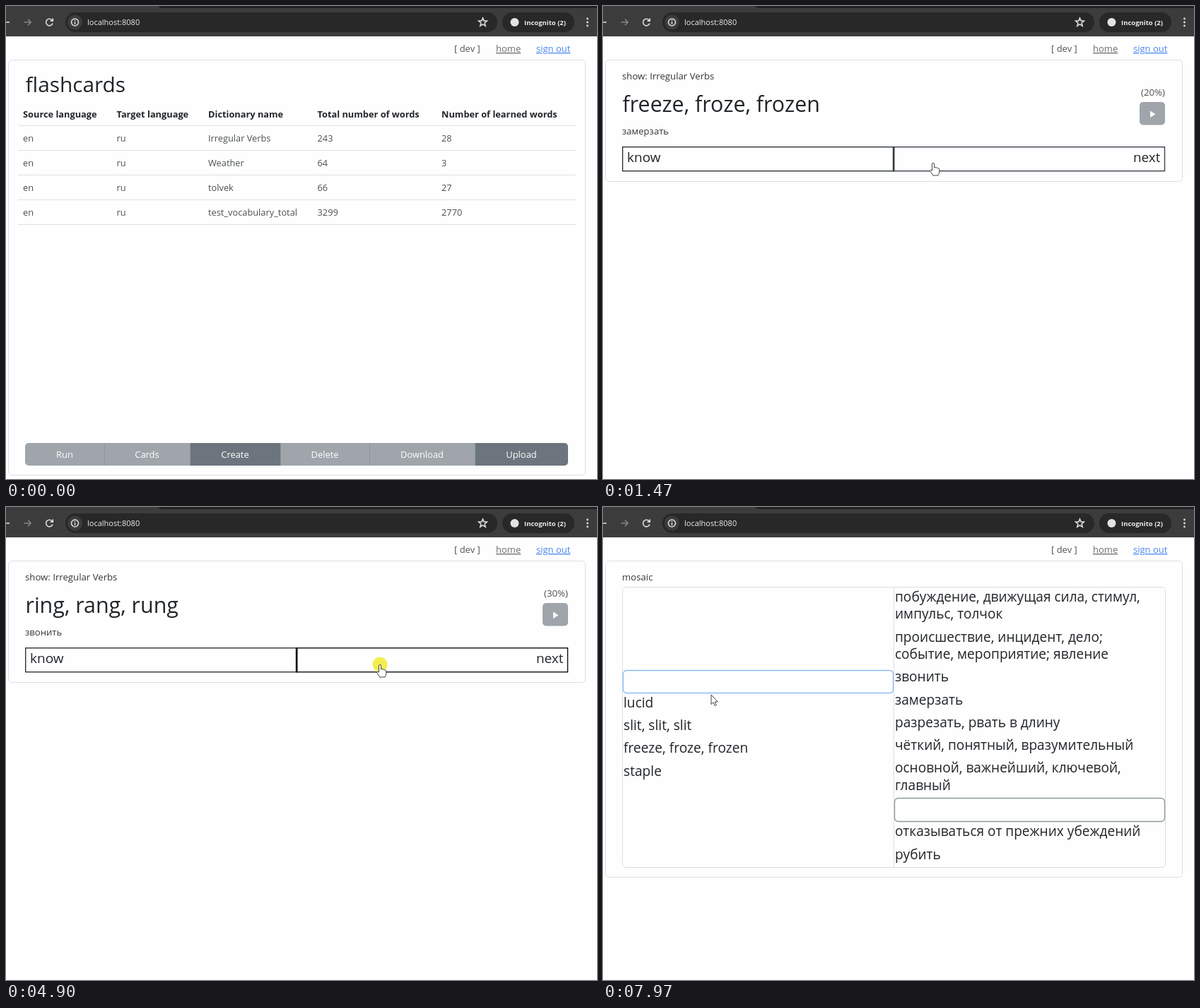
An HTML page that plays this animation: 836x670 px, repeating every 8 s.

```html
<!DOCTYPE html>
<html lang="en">
<head>
<meta charset="utf-8">
<title>flashcards</title>
<style>
html, body { margin: 0; width: 100%; height: 100%; overflow: hidden; background: #fefefe; }
svg { display: block; width: 836px; height: 670px; font-family: "Open Sans", "Noto Sans", sans-serif; }
text { white-space: pre; }
.line { fill: none; stroke: #dadee2; }
</style>
</head>
<body>
<svg id="stage" viewBox="0 0 836 670" xmlns="http://www.w3.org/2000/svg">
  <g id="browser">
    <rect width="836" height="43" fill="#3c3c3c"/>
    <path d="M215 0H836V3H222Q217 3 215 0Z" fill="#1f2020"/>
    <rect x="84" y="9" width="611" height="28" rx="14" fill="#282828"/>
    <rect x="702" y="9" width="102" height="28" rx="14" fill="#282828"/>
    <circle cx="97.500" cy="23" r="10.500" fill="#3c3c3c"/>
    <g fill="none" stroke="#dcdcdc" stroke-width="1.600">
      <path d="M-3 23H5M-1 19L-5 23L-1 27"/>
      <path d="M25.500 23H35M31 18.800L35.200 23L31 27.200" stroke="#858585"/>
      <path d="M65.500 20.500A4.800 4.800 0 1 0 66 24.500M66.300 17.500V21.300H62.500"/>
      <circle cx="97.500" cy="23" r="5"/>
      <path d="M97.500 22.300V26M97.500 19.800V21.200"/>
      <path d="M674.500 17L676.100 20.900L680.400 21.200L677.100 24L678.200 28.200L674.500 25.900L670.800 28.200L671.900 24L668.600 21.200L672.900 20.900Z"/>
    </g>
    <circle cx="719.500" cy="23" r="6" fill="#e3e3e3"/>
    <g fill="#dcdcdc"><circle cx="822.500" cy="18" r="1.400"/><circle cx="822.500" cy="23" r="1.400"/><circle cx="822.500" cy="28" r="1.400"/></g>
  </g>
  <rect id="card" class="line" x="3.500" y="76.500" width="816" height="588" rx="5"/>
  <g id="table"></g>
  <g id="show"></g>
  <g id="mosaic"></g>
  <circle id="click" r="10.500" fill="#f3ee4e"/>
  <path id="arrow" d="M0 0V13.500L3.100 10.800L5.300 15.600L7.400 14.600L5.200 10H9.400Z" fill="#fff" stroke="#444" stroke-width="1"/>
  <path id="hand" d="M-1.500 1Q0 -1 1.500 1V7Q3 5.800 4.200 7.200Q5.600 6.300 6.600 7.900Q8.600 7.400 8.800 9.500V13Q8.600 15.500 7 18H-.500Q-1.500 15.500 -4.500 11.500Q-4.800 9.300 -1.500 11.200Z" fill="#fff" stroke="#444" stroke-width="1"/>
</svg>
<script>
const NS = "http://www.w3.org/2000/svg";
const LOOP = 8000;
const $ = id => document.getElementById(id);

function add(parent, tag, attrs, label) {
  const el = document.createElementNS(NS, tag);
  for (const k in attrs) el.setAttribute(k, attrs[k]);
  if (label !== undefined) el.textContent = label;
  parent.appendChild(el);
  return el;
}
const text = (parent, x, y, size, label, extra) =>
  add(parent, "text", { x, y, "font-size": size, fill: "#212529", ...extra }, label);
const box = (parent, x, y, width, height, extra) =>
  add(parent, "rect", { x, y, width, height, ...extra });
const show = (el, on) => el.setAttribute("visibility", on ? "visible" : "hidden");
const within = (t, [from, to]) => t >= from && t < to;
const MEDIUM = { "font-weight": 500 };

// Browser bar and page links
text($("browser"), 115, 27, 11, "localhost:8080", { fill: "#ececec", ...MEDIUM });
text($("browser"), 733, 26.6, 9.5, "Incognito (2)", { fill: "#ececec", "font-weight": 700 });
text($("browser"), 634, 65, 13, "[ dev ]", { fill: "#555" });
text($("browser"), 693, 65, 13, "home", { fill: "#6c6c6c", "text-decoration": "underline" });
text($("browser"), 750, 65, 13, "sign out", { fill: "#4a86f0", "text-decoration": "underline" });

// Dictionary table
const table = $("table");
const columns = [24, 156.5, 286, 440.5, 616];
const heads = ["Source language", "Target language", "Dictionary name", "Total number of words", "Number of learned words"];
const rows = [
  ["en", "ru", "Irregular Verbs", "243", "28"],
  ["en", "ru", "Weather", "64", "3"],
  ["en", "ru", "tolvek", "66", "27"],
  ["en", "ru", "test_vocabulary_total", "3299", "2770"]
];
const picks = { 0: 280, 2: 480 };
text(table, 27.5, 121.5, 29.8, "flashcards", MEDIUM);
heads.forEach((h, i) => text(table, columns[i], 157.5, 12.8, h, { "font-weight": 700 }));
box(table, 17, 169, 789, 1, { fill: "#dee2e6" });
const fills = rows.map((row, r) => {
  const y = 170 + r * 34.9;
  const fill = box(table, 17, y, 789, 34, { fill: "#d1e7dd" });
  box(table, 17, Math.round(y + 34), 789, 1, { fill: "#dee2e6" });
  row.forEach((s, i) => text(table, columns[i], y + 22.3, 12.8, s, { fill: "#4c5054" }));
  return fill;
});

// Each button: label, left edge, numbers of picked rows that enable it
const buttons = [
  ["Run", 27, [1, 2]], ["Cards", 139, [1]], ["Create", 260, [0, 1, 2]],
  ["Delete", 388, [1]], ["Download", 514, [1]], ["Upload", 663, [0, 1, 2]]
];
const bar = add(table, "g", { style: "clip-path: inset(0 round 5px)" });
const faces = buttons.map(([label, x], i) => {
  const end = i < 5 ? buttons[i + 1][1] : 795;
  const face = box(bar, x, 619, end - x, 32);
  if (i) box(bar, x, 619, 1, 32, { fill: "#8f969d" });
  text(table, (x + end) / 2, 640, 12.9, label, { fill: "#fff", "text-anchor": "middle", ...MEDIUM });
  return face;
});

// Word cards: start time, dictionary, percent, words, translation lines
const IV = "Irregular Verbs", TV = "tolvek";
const cards = [
  [830, IV, 20, "freeze, froze, frozen", ["замерзать"]],
  [1740, TV, 10, "incident", ["происшествие, инцидент, дело;", "событие, мероприятие; явление"]],
  [2190, TV, 30, "lucid", ["чёткий, понятный, вразумительный"]],
  [2800, IV, 0, "backslide, backslid, backslidden | backslid", ["отказываться от прежних убеждений"]],
  [3480, TV, 20, "staple", ["основной, важнейший, ключевой, главный"]],
  [3900, IV, 30, "slit, slit, slit", ["разрезать, рвать в длину"]],
  [4400, IV, 30, "ring, rang, rung", ["звонить"]],
  [5060, TV, 10, "impetus", ["побуждение, движущая сила, стимул, импульс, толчок"]],
  [5720, TV, 0, "disposed", ["склонный, расположенный, настроенный"]],
  [6270, IV, 10, "hew, hewed, hewn | hewed", ["рубить"]]
];
const MOSAIC = 6830, CHOSEN = 7300, MATCH = 7640;
const deck = $("show");
const dict = text(deck, 27, 103.5, 13.2, "", { fill: "#33373b" });
const word = text(deck, 27.5, 149.5, 30.4, "", MEDIUM);
const lines = [0, 1].map(i => text(deck, 27, 182 + i * 17, 13.1, "", { fill: "#33373b" }));
const percent = text(deck, 795, 126.5, 13.3, "", { "text-anchor": "end", fill: "#4c5054" });
box(deck, 759, 136, 36, 32.5, { rx: 5, fill: "#9fa5ab" });
add(deck, "path", { d: "M774 148.500L781.500 153.200L774 158Z", fill: "#fff" });
const pair = add(deck, "g", {});
const edge = { fill: "none", stroke: "#30353a", "stroke-width": 1.4 };
box(pair, 27.7, 199.7, 383, 34, edge);
const next = box(pair, 411.5, 199.7, 383, 34, edge);
const split = box(pair, 409.8, 199, 2.6, 35.4);
text(pair, 34, 220.5, 19, "know", MEDIUM);
text(pair, 788.5, 220.5, 19, "next", { "text-anchor": "end", ...MEDIUM });

// Mosaic: words on the left, translations on the right
const mosaic = $("mosaic");
text(mosaic, 27, 103.5, 13.2, "mosaic", { fill: "#33373b" });
const frame = box(mosaic, 27.5, 113.5, 768, 421, { class: "line", rx: 5 });
const middle = box(mosaic, 411, 114, 1, 420, { fill: "#dadee2" });
const left = ["disposed", "lucid", "slit, slit, slit", "freeze, froze, frozen", "staple"]
  .map(s => text(mosaic, 29, 0, 19.2, s, MEDIUM));
const right = [
  ["побуждение, движущая сила, стимул,", "импульс, толчок"],
  ["происшествие, инцидент, дело;", "событие, мероприятие; явление"],
  ["звонить"], ["замерзать"], ["разрезать, рвать в длину"],
  ["чёткий, понятный, вразумительный"],
  ["основной, важнейший, ключевой,", "главный"],
  ["склонный, расположенный,", "настроенный"],
  ["отказываться от прежних убеждений"], ["рубить"]
].map(item => item.map(s => text(mosaic, 413, 0, 19.1, s, MEDIUM)));
const GONE = 7;
const blue = box(mosaic, 28.5, 231.5, 382, 32, { rx: 5, fill: "none", stroke: "#8bbcf5", "stroke-width": 1.3 });
const green = box(mosaic, 412.5, 412.5, 382, 33, { rx: 5, fill: "none", stroke: "#8c9a95", "stroke-width": 1.3 });

// Pointer tip: time, x, y
const path = [
  [20, 430, 4], [250, 325, 184], [300, 320, 185], [460, 212, 252], [520, 212, 252],
  [650, 249, 219], [790, 82, 630], [850, 82, 630], [1270, 424, 212], [1330, 467, 222],
  [1470, 467, 222], [1600, 529, 223], [6850, 529, 223], [7140, 195, 256], [7260, 155, 256],
  [7330, 155, 256], [7560, 470, 432], [7680, 470, 432], [7960, 153, 266], [8000, 153, 266]
];
const hands = [[780, 870], [1250, 6870]];
const clicks = [
  [250, 300], [460, 510], [795, 830], [1640, 1740], [2050, 2190], [2620, 2800], [3140, 3480],
  [3670, 3900], [4180, 4400], [4900, 5060], [5460, 5720], [5970, 6270], [6650, 6830],
  [7270, 7330], [7590, 7640]
];

function pointer(t) {
  let i = 1;
  while (i < path.length - 1 && t > path[i][0]) i++;
  const [t0, x0, y0] = path[i - 1], [t1, x1, y1] = path[i];
  const p = Math.min(1, Math.max(0, (t - t0) / (t1 - t0)));
  const e = p * p * (3 - 2 * p);
  return [x0 + (x1 - x0) * e, y0 + (y1 - y0) * e];
}

function drawTable(t) {
  const count = Object.values(picks).filter(at => t >= at).length;
  fills.forEach((el, i) => show(el, t < cards[0][0] && t >= picks[i]));
  faces.forEach((el, i) => el.setAttribute("fill", buttons[i][2].includes(count) ? "#6c757d" : "#9fa5ab"));
}

function drawCard(t, pressed) {
  const [, name, value, words, meaning] = cards.filter(c => t >= c[0]).pop();
  dict.textContent = "show: " + name;
  percent.textContent = `(${value}%)`;
  word.textContent = words;
  lines.forEach((el, i) => el.textContent = meaning[i] || "");
  const extra = (meaning.length - 1) * 17;
  pair.setAttribute("transform", `translate(0 ${extra})`);
  next.setAttribute("stroke", pressed ? "#111" : "#3c444c");
  split.setAttribute("fill", pressed ? "#111" : "#343b43");
  return 172 + extra;
}

function drawMosaic(t) {
  const matched = t >= MATCH;
  left.forEach((el, i) => el.setAttribute("y", 263 + i * 32.3 - (matched ? 11.5 : 0)));
  show(left[0], t >= MOSAIC && !matched);
  let y = 134.2;
  right.forEach((item, i) => {
    const hidden = matched && i === GONE;
    item.forEach((el, k) => {
      el.setAttribute("y", y + k * 24.2);
      show(el, t >= MOSAIC && !hidden);
    });
    y += 32.3 + (hidden ? 1 : (item.length - 1) * 24.2);
  });
  const cut = matched ? 24 : 0;
  frame.setAttribute("height", 421 - cut);
  middle.setAttribute("height", 420 - cut);
  blue.setAttribute("y", matched ? 231.5 : 241.5);
  show(blue, t >= CHOSEN);
  show(green, matched);
  return 472 - cut;
}

function draw(t) {
  const pressed = clicks.some(c => within(t, c));
  const stage = t < cards[0][0] ? 0 : t < MOSAIC ? 1 : 2;
  [table, deck, mosaic].forEach((el, i) => show(el, i === stage));
  drawTable(t);
  const height = stage === 1 ? drawCard(t, pressed) : 588;
  const tall = drawMosaic(t);
  $("card").setAttribute("height", stage === 2 ? tall : height);

  const [x, y] = pointer(t);
  const hand = hands.some(h => within(t, h));
  for (const id of ["arrow", "hand", "click"]) $(id).setAttribute("transform", `translate(${x} ${y})`);
  show($("arrow"), t >= 20 && !hand);
  show($("hand"), hand);
  show($("click"), pressed);
}

const start = performance.now();
function tick(now) {
  draw(Math.max(0, now - start) % LOOP);
  requestAnimationFrame(tick);
}
draw(0);
requestAnimationFrame(tick);
</script>
</body>
</html>
```
